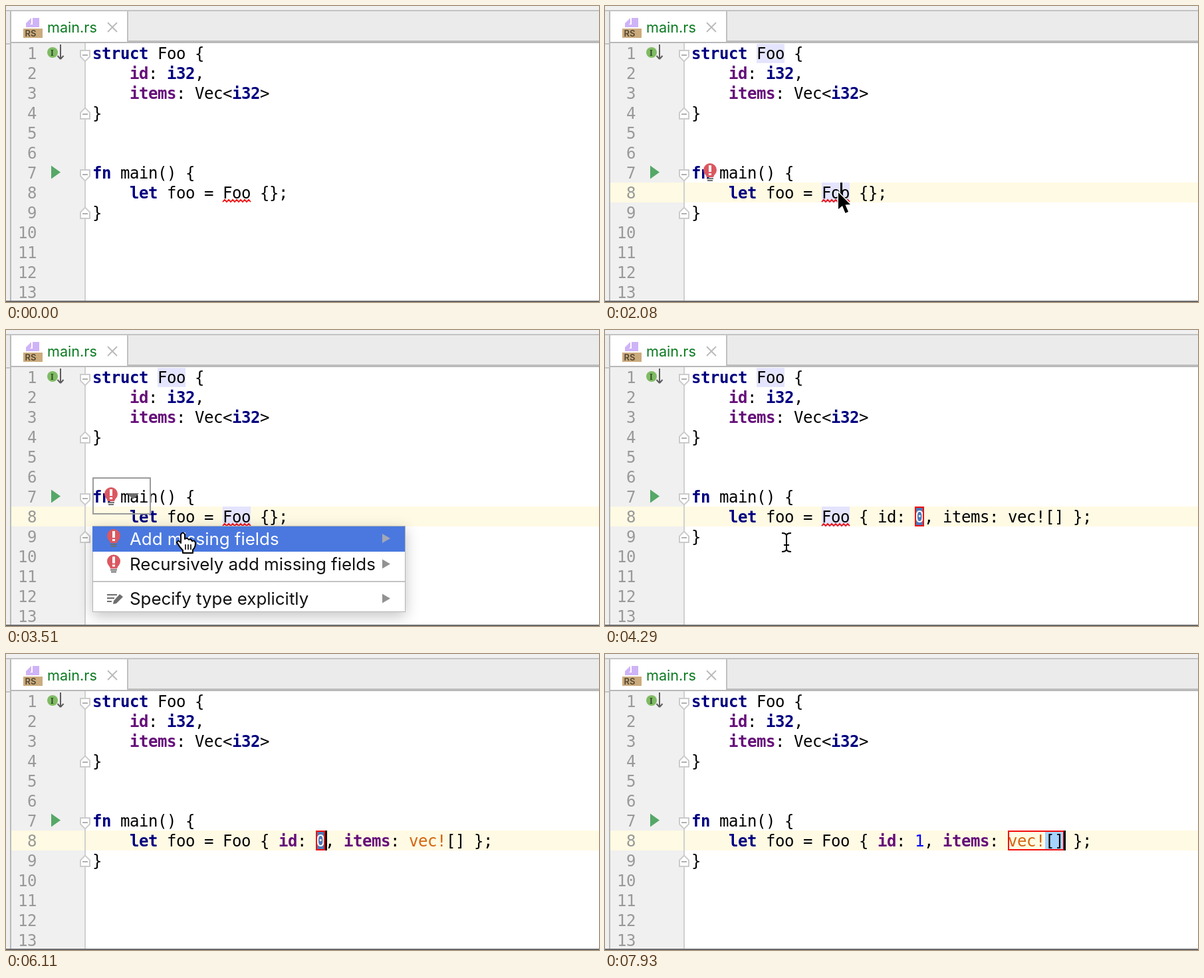
Recreate the animation shown at these times as an HTML page with a canvas. Size 892 by 446 pixels, loop 8000 ms.

```html
<!DOCTYPE html>
<html lang="en">
<head>
<meta charset="utf-8">
<title>Editor: add missing fields</title>
<style>
html, body { margin: 0; width: 892px; height: 446px; overflow: hidden; background: #fff; }
canvas { display: block; }
</style>
</head>
<body>
<canvas id="stage" width="892" height="446"></canvas>
<script>
const g = document.getElementById('stage').getContext('2d');
const LOOP = 8000, STEP = 130;
const MONO = '24px "DejaVu Sans Mono", monospace';
const UI = 'Inter, sans-serif';
const LEFT = 130, CELL = 14, LINE = 30;
const NAVY = '#000080', PURPLE = '#660e7a', BLUE = '#0000ff', ORANGE = '#d4650f', BLACK = '#000';

// Moments of the story, in ms
const T = { show: 390, arrive: 1040, click: 1690, bulb: 2080, leave: 2080, hover: 2730,
  menu: 3250, pick: 3900, colored: 4810, hide: 5070, typed: 6760, tab: 7280 };

const colX = c => LEFT + c * CELL;
const baseY = n => 50 + n * LINE;
const rowY = n => 26 + n * LINE;

function rect(x, y, w, h, color) {
  g.fillStyle = color;
  g.fillRect(x, y, w, h);
}

function shape(points, fill, stroke, width = 2) {
  g.beginPath();
  points.forEach(([x, y], i) => i ? g.lineTo(x, y) : g.moveTo(x, y));
  g.closePath();
  if (stroke) {
    g.strokeStyle = stroke;
    g.lineWidth = width;
    g.stroke();
  }
  if (fill) {
    g.fillStyle = fill;
    g.fill();
  }
}

function line(x1, y1, x2, y2, color, width = 2) {
  g.strokeStyle = color;
  g.lineWidth = width;
  g.beginPath();
  g.moveTo(x1, y1);
  g.lineTo(x2, y2);
  g.stroke();
}

function disc(x, y, r, color) {
  g.fillStyle = color;
  g.beginPath();
  g.arc(x, y, r, 0, 7);
  g.fill();
}

function label(str, x, y, font, color) {
  g.font = font;
  g.fillStyle = color;
  g.fillText(str, x, y);
}

function cells(str, x, y, color, bold) {
  g.font = (bold ? 'bold ' : '') + MONO;
  g.fillStyle = color;
  [...str].forEach((ch, i) => g.fillText(ch, x + i * CELL, y));
}

// Each token: [text, color, bold]
function code(n, col, tokens) {
  for (const [str, color = BLACK, bold = false] of tokens) {
    cells(str, colX(col), baseY(n), color, bold);
    col += str.length;
  }
}

function frameBars() {
  rect(0, 0, 892, 446, '#fff');
  rect(0, 0, 892, 55, '#ebebeb');
  rect(0, 0, 892, 6, '#f0f0f0');
  rect(0, 6, 892, 2, '#c3c3c3');
  rect(0, 55, 7, 391, '#efefef');
  rect(0, 56, 7, 2, '#c3c3c3');
  rect(8, 55, 111, 391, '#f0f0f0');
  rect(8, 8, 175, 47, '#fff');
  rect(182, 8, 2, 46, '#c0c0c0');
  rect(183, 52, 709, 2, '#bdbdbd');
  rect(8, 54, 884, 2, '#b8b8b8');
  rect(6, 8, 2, 438, '#bababa');

  shape([[30, 29], [30, 26], [38, 18], [38, 26], [33, 31]], '#cfb3f8');
  shape([[40, 18], [50, 18], [50, 32], [30, 32], [30, 28], [40, 28]], '#cfb3f8');
  rect(26, 34, 29, 14, '#cbab7c');
  label('RS', 28.5, 46, '600 13px ' + UI, '#514634');
  label('main.rs', 62, 40, '21.6px ' + UI, '#0a7a20');
  line(153, 25, 167, 39, '#bbb');
  line(167, 25, 153, 39, '#bbb');
}

function fold(n, up) {
  const y = baseY(n), s = up ? -1 : 1, c = up ? y - 7 : y - 6;
  const p = [[-6, -6], [6, -6], [6, 2], [0, 8], [-6, 2]];
  shape(p.map(([dx, dy]) => [119 + dx, c + s * dy]), '#fff', '#cbcbcb', 4);
  line(115, c, 123, c, '#b0b0b0');
}

function gutter() {
  rect(118, 56, 2, 390, '#d0d0d0');
  for (let n = 1; n <= 13; n++) {
    const s = String(n);
    cells(s, 46 - s.length * CELL, baseY(n), '#999');
  }
  disc(70, 70, 8, '#7fbb63');
  label('I', 67, 74.5, 'bold 12px "Noto Serif", serif', '#2f4a26');
  line(82, 58, 82, 80, '#5c5c5c');
  line(77.5, 75, 82, 80, '#5c5c5c');
  line(86.5, 75, 82, 80, '#5c5c5c');
  shape([[68, 240.5], [82, 250.5], [68, 260.5]], '#55a867');
  fold(1, false);
  fold(4, true);
  fold(7, false);
  fold(9, true);
}

function squiggle(x, y, w) {
  g.strokeStyle = '#f01414';
  g.lineWidth = 1.8;
  g.beginPath();
  for (let i = 0; i <= w; i += 3) g.lineTo(x + i, y + (i % 2 ? -1.7 : 1.7));
  g.stroke();
}

function body(t) {
  code(1, 0, [['struct', NAVY, true], [' Foo {']]);
  code(2, 4, [['id', PURPLE, true], [': '], ['i32', NAVY, true], [',']]);
  code(3, 4, [['items', PURPLE, true], [': Vec<'], ['i32', NAVY, true], ['>']]);
  code(4, 0, [['}']]);
  code(7, 0, [['fn', NAVY, true], [' main() {']]);
  code(9, 0, [['}']]);
  const head = [['let', NAVY, true], [' foo = Foo {']];
  if (t < T.pick) {
    code(8, 4, [...head, ['};']]);
  } else {
    const rich = t >= T.colored, field = rich ? PURPLE : BLACK;
    const num = t < T.typed ? ['0', '#fff'] : ['1', BLUE];
    code(8, 4, [...head, [' '], ['id', field, rich], [': '], num, [', '],
      ['items', field, rich], [': '], ['vec!', rich ? ORANGE : BLACK], ['[] };']]);
  }
  if (t < T.colored) squiggle(326, 293.5, 42);
}

function marks(t) {
  const y = rowY(8);
  if (t < T.click) return;
  rect(8, y, 884, LINE, '#fffae3');
  rect(118, y, 2, LINE, '#d0d0d0');
  if (t < T.colored) {
    rect(228, 57, 42, 29, '#e4e4ff');
    rect(326, y, 42, LINE, '#e4e4ff');
  }
  if (t >= T.pick && t < T.typed) rect(466, y, 14, LINE, '#4b78b8');
  if (t >= T.tab) rect(662, y, 28, LINE, '#a6d2ff');
}

function box(x, y, w, h, color) {
  g.strokeStyle = color;
  g.lineWidth = 2;
  g.strokeRect(x, y, w, h);
}

function outline(t) {
  if (t < T.pick) return;
  if (t < T.tab) box(467, 267, 12, 28, '#f20d0d');
  else box(607, 267, 83, 28, '#f20d0d');
}

function caret(t) {
  if (t < T.click || (t >= T.menu && t < T.pick)) return;
  if ((t + 250) % 1000 >= 500) return;
  const x = t < T.pick ? 354 : t < T.tab ? 480 : 690;
  rect(x, rowY(8), 3, LINE, BLACK);
}

function bulb(x, y) {
  disc(x, y, 10, '#db5860');
  shape([[x - 8, y + 4], [x + 8, y + 4], [x + 5, y + 11], [x - 5, y + 11]], '#db5860');
  rect(x - 2, y - 7, 4, 10, '#fff');
  rect(x - 2, y + 5, 4, 3, '#fff');
  rect(x - 5, y + 12, 10, 2, '#6e6e6e');
  rect(x - 4, y + 15, 8, 2, '#6e6e6e');
}

function hint(t) {
  if (t < T.bulb || t >= T.pick) return;
  bulb(158, 247);
  if (t < T.hover) return;
  box(131, 223, 86, 54, '#9b9b9b');
  shape([[182, 246], [200, 246], [191, 255]], '#6e6e6e');
}

function pencil(x, y) {
  [[0, 15], [5, 11], [10, 7]].forEach(([dy, w]) => rect(x, y + dy, w, 2, '#6e6e6e'));
  shape([[x + 9, y + 15], [x + 10, y + 10], [x + 19, y], [x + 24, y + 4], [x + 14, y + 14]], '#6e6e6e');
}

function menu(t) {
  if (t < T.menu || t >= T.pick) return;
  g.save();
  g.shadowColor = 'rgba(0,0,0,.24)';
  g.shadowBlur = 20;
  g.shadowOffsetY = 6;
  rect(130, 295, 471, 130, '#b4b4b4');
  g.restore();
  rect(131, 296, 469, 128, '#fff');
  rect(130, 296, 470, 38, '#4a78df');
  rect(131, 378, 469, 2, '#c4c4c4');
  const rows = [['Add missing fields', 314, '#fff'], ['Recursively add missing fields', 352.5, '#111'],
    ['Specify type explicitly', 404.5, '#111']];
  rows.forEach(([str, y, color], i) => {
    label(str, 186, y + 9.5, '25.9px ' + UI, color);
    shape([[566, y - 7], [578, y], [566, y + 7]], i ? '#929292' : '#a2a7b5');
    if (i < 2) bulb(162, y - 4);
  });
  pencil(152, 398);
}

function arrow(x, y) {
  const p = [[0, 0], [0, 25], [6, 20], [10.5, 31], [15, 29], [10.5, 18.5], [18, 18]];
  shape(p.map(([dx, dy]) => [x + dx, y + dy]), BLACK, '#fff', 3);
}

function hand(x, y) {
  g.save();
  g.translate(x, y);
  g.beginPath();
  g.moveTo(-3, 15);
  g.lineTo(-3, 2);
  g.quadraticCurveTo(0, -3, 3, 2);
  g.lineTo(3, 9);
  g.quadraticCurveTo(6, 6, 9, 10);
  g.quadraticCurveTo(12, 8, 14, 12);
  g.quadraticCurveTo(18, 10, 19, 15);
  g.quadraticCurveTo(19, 22, 15, 25);
  g.lineTo(15, 30);
  g.lineTo(0, 30);
  g.lineTo(0, 26);
  g.quadraticCurveTo(-5, 21, -9, 14);
  g.quadraticCurveTo(-7, 9, -3, 15);
  g.closePath();
  g.fillStyle = '#fff';
  g.fill();
  g.strokeStyle = BLACK;
  g.lineWidth = 2;
  g.lineJoin = 'round';
  g.stroke();
  [4, 8, 12].forEach(dx => line(dx, 17, dx, 25, BLACK, 1.6));
  g.restore();
}

function beam(x, y) {
  for (const [color, width] of [['#fff', 4], [BLACK, 2]]) {
    g.strokeStyle = color;
    g.lineWidth = width;
    g.beginPath();
    for (const s of [-1, 1]) {
      g.moveTo(x - 7, y + s * 14);
      g.quadraticCurveTo(x, y + s * 14, x, y + s * 10);
      g.quadraticCurveTo(x, y + s * 14, x + 7, y + s * 14);
    }
    g.moveTo(x, y - 11);
    g.lineTo(x, y + 11);
    g.moveTo(x - 4, y + 4);
    g.lineTo(x + 4, y + 4);
    g.stroke();
  }
}

const path = [[T.show, 414, 373], [T.arrive, 351, 281], [T.leave, 351, 281], [T.hover + 130, 179, 245],
  [T.menu - 130, 179, 245], [T.menu + 130, 266, 306], [T.pick - 130, 266, 306], [T.pick, 273, 320]];

function pointerAt(t) {
  const i = path.findIndex(k => k[0] > t);
  if (i < 0) return path[path.length - 1].slice(1);
  const [t0, x0, y0] = path[i - 1], [t1, x1, y1] = path[i];
  const u = (t - t0) / (t1 - t0), e = u * u * (3 - 2 * u);
  return [x0 + (x1 - x0) * e, y0 + (y1 - y0) * e];
}

function pointer(t) {
  if (t < T.show || t >= T.hide) return;
  const draw = t < T.menu + 130 ? arrow : t < T.pick ? hand : beam;
  draw(...pointerAt(t));
}

function render(t) {
  frameBars();
  marks(t);
  gutter();
  body(t);
  outline(t);
  hint(t);
  caret(t);
  menu(t);
  rect(0, 444, 892, 2, '#6a6a6a');
  pointer(t);
}

const start = performance.now();
function tick() {
  const t = (performance.now() - start) % LOOP;
  render(Math.floor(t / STEP) * STEP);
  requestAnimationFrame(tick);
}
tick();
</script>
</body>
</html>
```
